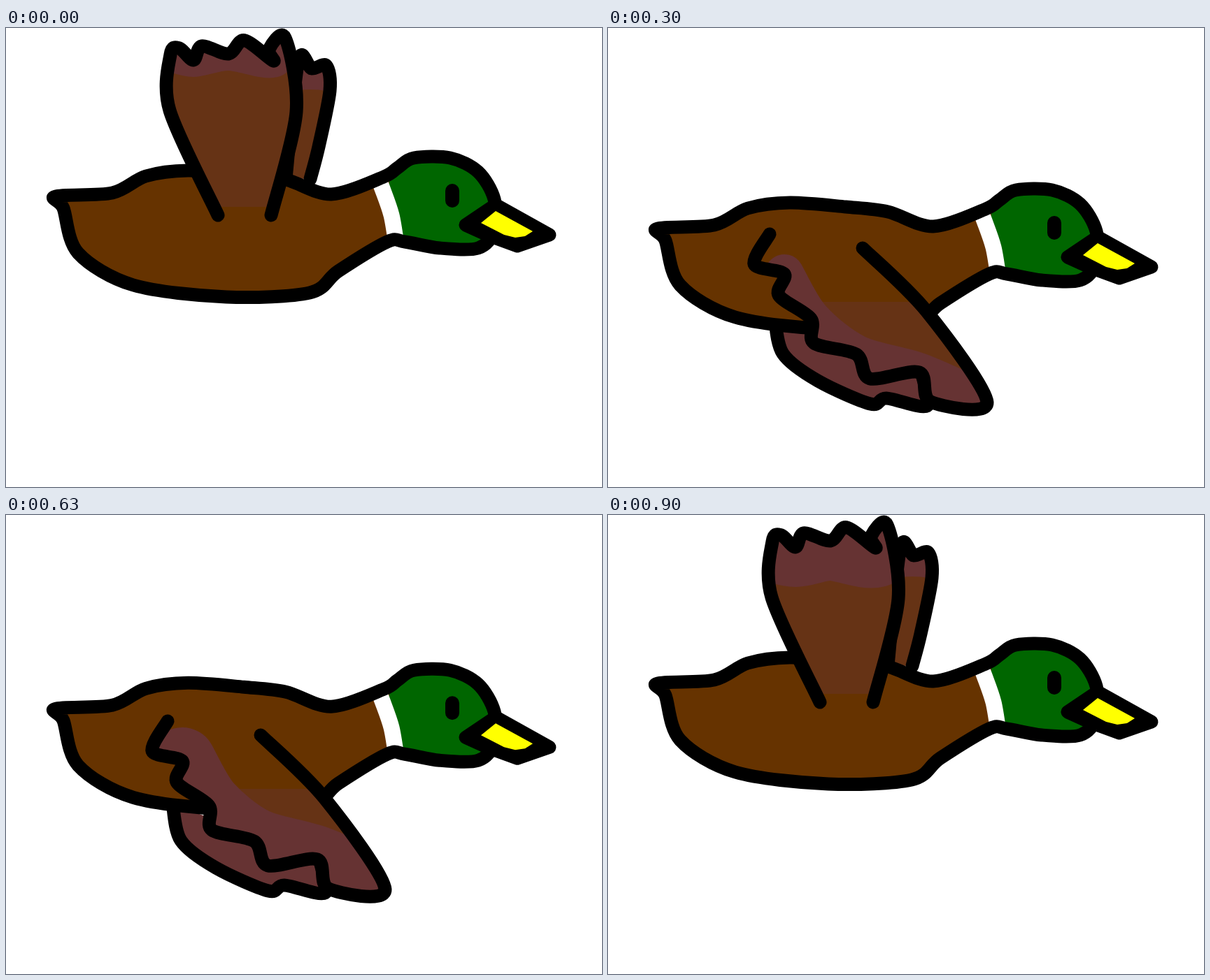
Write an HTML page with a canvas that moves like this. It is 852 px wide and 657 px high and loops after 0.93 s.

```html
<!DOCTYPE html>
<html lang="en">
<head>
<meta charset="utf-8">
<title>Flying duck</title>
<style>
  html, body { margin: 0; width: 100%; height: 100%; overflow: hidden; background: #fff; }
  canvas { display: block; }
</style>
</head>
<body>
<canvas id="stage" width="852" height="657"></canvas>
<script>
const ctx = document.getElementById('stage').getContext('2d');
const INK = '#000', BODY = '#630', WING = '#663315', TIP = '#633', HEAD = '#060', BILL = '#ff0', SHEEN = '#36601c';
const STEP = 30, STEPS = 31, LINE = 19;
const points = text => text.split(' ').map(pair => pair.split(',').map(Number));

// Back (tail to neck) and belly (neck to tail), stretched and curled up
const back = [
  '71,241 152,236 200,212 260,204 340,210 400,217 465,238 540,213',
  '90,224 132,237 210,214 300,204 370,210 420,222 467,238 540,217'
].map(points);
const belly = [
  '545,306 475,348 434,379 315,385 182,368 103,322 82,258',
  '545,309 475,354 438,381 375,393 220,370 120,326 84,260'
].map(points);
const head = points('560,200 583,186 635,186 675,206 698,245 698,290 675,315 620,315 570,306');
const collar = points('528,205 538,230 551,268 558,310');
const sheen = points('633,194 664,203 686,230');
const eye = points('638,233 638,247');
const bill = points('657,282 700,253 777,296 731,312 690,297');
const billTop = points('700,262 753,291 742,298 728,300 712,296 679,279');
const REACH = 12;

// Wings raised, half raised, half lowered, lowered.
// Near: back root, back bend, five feather notches, front bend, front root
const nearWing = [
  '303,268 234,118 235,38 268,46 318,37 382,47 399,14 415,120 379,268',
  '237,286 288,168 414,108 405,135 433,140 435,172 455,180 412,240 348,294',
  '231,295 209,338 252,352 290,416 355,467 445,493 542,536 455,405 364,315',
  '218,320 204,360 234,393 250,462 311,516 390,570 459,609 405,437 336,341'
].map(points);
const farWing = [
  '400,215 418,47 437,58 458,54 463,90 447,170 435,216',
  '425,225 436,145 478,150 491,160 489,188 503,202 420,250',
  '238,412 250,466 300,505 375,538 398,530 456,541 450,500',
  '413,450 428,492 440,525 449,560 468,560 462,505 452,440'
].map(points);
const featherBulge = [-.35, -.1, .3, .27];
// Width of the dark feather band over a whole beat, down and up again
const bandWidth = [24, 65, 28, 35, 48, 55, 57];

// Position along the beat for each wing drawing
const beat = [0, .5, 1, 1.33, 1.67, 2, 2.8, 3];
// Step and amount of the body's curl
const curls = [[0, 0], [4, 1], [10, 0], [17, 1], [21, 0], [26, .42], [30, 0]];

function lerp(a, b, f) {
  return Array.isArray(a) ? a.map((v, i) => lerp(v, b[i], f)) : a + (b - a) * f;
}

function mix(keys, at) {
  const i = Math.min(Math.floor(at), keys.length - 2);
  return lerp(keys[i], keys[i + 1], at - i);
}

function curlAt(step) {
  const i = Math.max(1, curls.findIndex(key => key[0] >= step));
  const [[from, a], [to, b]] = [curls[i - 1], curls[i]];
  return lerp(a, b, (step - from) / (to - from));
}

function polygon(pts) {
  const path = new Path2D();
  pts.forEach(p => path.lineTo(...p));
  path.closePath();
  return path;
}

// Smooth curve through all points
function curve(pts, closed) {
  const n = pts.length, path = new Path2D();
  const get = i => pts[closed ? (i + n) % n : Math.max(0, Math.min(n - 1, i))];
  path.moveTo(...pts[0]);
  for (let i = 0; i < (closed ? n : n - 1); i++) {
    const [a, b, c, d] = [get(i - 1), get(i), get(i + 1), get(i + 2)];
    path.bezierCurveTo(b[0] + (c[0] - a[0]) / 6.5, b[1] + (c[1] - a[1]) / 6.5,
      c[0] - (d[0] - b[0]) / 6.5, c[1] - (d[1] - b[1]) / 6.5, ...c);
  }
  return path;
}

// Adds a rounded feather end between neighbouring notches
function feathered(pts, bulge) {
  return pts.flatMap((p, i) => {
    if (i < 2 || i > 5) return [p];
    const [dx, dy] = [pts[i + 1][0] - p[0], pts[i + 1][1] - p[1]];
    return [p, [p[0] + dx * .3 - dy * bulge, p[1] + dy * .3 + dx * bulge]];
  });
}

function fill(path, color) {
  ctx.fillStyle = color;
  ctx.fill(path);
}

function stroke(path, width = LINE, color = INK) {
  ctx.lineWidth = width;
  ctx.strokeStyle = color;
  ctx.stroke(path);
}

function inside(path, paint) {
  ctx.save();
  ctx.clip(path);
  paint();
  ctx.restore();
}

function drawBody(step) {
  const curl = curlAt(step), reach = REACH * curl;
  const shape = curve([
    ...mix(back, curl),
    ...head.map(([x, y]) => [x + reach, y]),
    ...mix(belly, curl)
  ], true);
  ctx.save();
  ctx.translate(0, step < 14 ? 4.6 * step : 4.03 * (30 - step));
  fill(shape, BODY);
  inside(shape, () => {
    ctx.fillStyle = HEAD;
    ctx.fillRect(548, 150, 200, 200);
    stroke(curve(collar), 23, '#fff');
    ctx.translate(reach, 0);
    if (curl > .5) stroke(curve(sheen), 14, SHEEN);
  });
  stroke(shape);
  ctx.translate(reach, 0);
  stroke(polygon(eye), 20);
  fill(polygon(bill), INK);
  stroke(polygon(bill));
  fill(polygon(billTop), BILL);
  ctx.restore();
}

function drawFarWing(down) {
  const pts = mix(farWing, down), shape = curve(pts);
  const root = new Path2D();
  root.arc(...pts.at(-1), Math.max(0, 128 - 66 * down), 0, 7);
  fill(shape, TIP);
  inside(shape, () => fill(root, WING));
  stroke(shape);
}

function drawNearWing(down, band) {
  const pts = mix(nearWing, down);
  const shape = curve(feathered(pts, mix(featherBulge, down)));
  inside(shape, () => {
    ctx.fillStyle = WING;
    if (down < 1.5) ctx.fillRect(0, 0, 852, 256);
    else ctx.fillRect(0, 340 + 26 * down, 852, 400);
    stroke(curve(pts.slice(2, 7)), 2 * band, TIP);
  });
  stroke(shape);
}

function draw(step) {
  const pose = step >> 1;
  const at = pose < 8 ? beat[pose] : 6 - beat[15 - pose];
  const down = Math.min(at, 6 - at);
  ctx.fillStyle = '#fff';
  ctx.fillRect(0, 0, 852, 657);
  ctx.lineCap = ctx.lineJoin = 'round';
  drawFarWing(down);
  drawBody(step);
  drawNearWing(down, mix(bandWidth, at));
}

function tick() {
  draw(Math.floor(performance.now() / STEP) % STEPS);
  requestAnimationFrame(tick);
}
tick();
</script>
</body>
</html>
```
